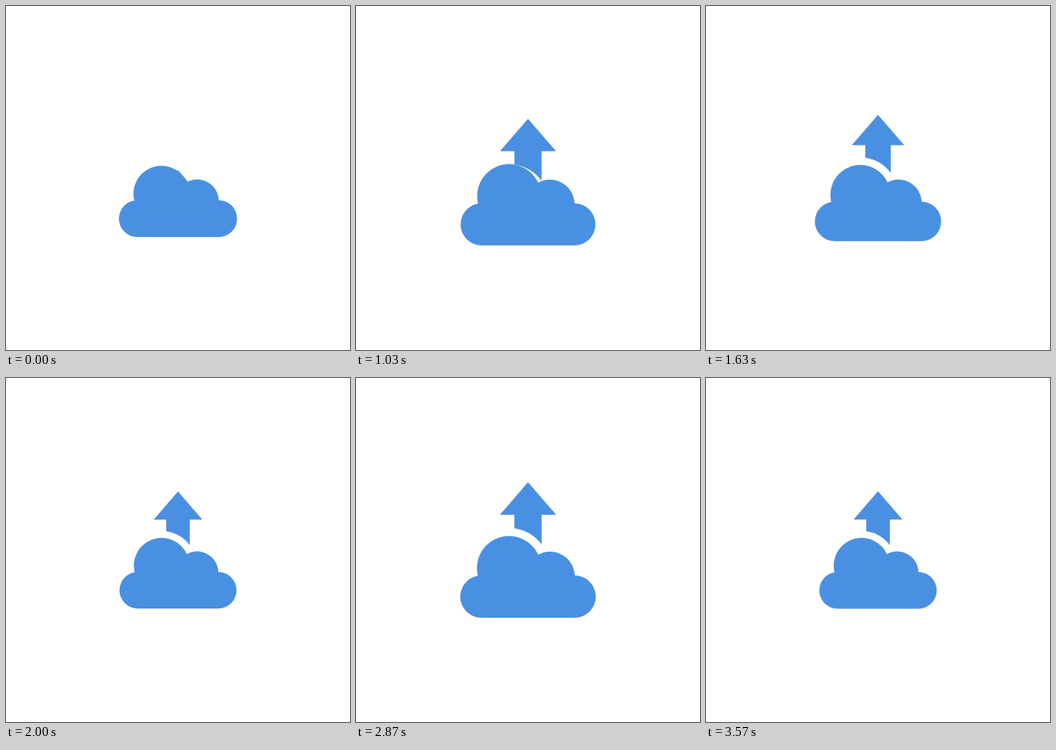
An HTML page that plays this animation: 640x640 px, repeating every 3610 ms.

```html
<!DOCTYPE html>
<html lang="en">
<head>
<meta charset="utf-8">
<title>Cloud upload</title>
<style>
  html, body { margin: 0; width: 100%; height: 100%; overflow: hidden; background: #fff; }
  svg { display: block; width: 100%; height: 100%; fill: #4a90e2; }
  #icon, #arrow { transform-box: view-box; transform-origin: 0 0; }
</style>
</head>
<body>
<svg viewBox="0 0 640 640">
  <g transform="translate(320 320)">
    <g id="icon">
      <path id="arrow" d="M0-128 53.2-66.5H25.8V-10.3A76 76 0 0 0-25.8-41.1V-66.5H-53.2Z"/>
      <circle cx="-35.9" cy="34.2" r="60.6"/>
      <circle cx="41.6" cy="49.8" r="46.7"/>
      <rect x="-128" y="48" width="80" height="80" rx="40"/>
      <rect x="48" y="48" width="80" height="80" rx="40"/>
      <rect x="-88" y="50" width="176" height="78"/>
    </g>
  </g>
</svg>
<script>
  const LOOP = 3610;

  // Each step is [time in ms, value]; values run linearly between steps.
  function play(id, steps, toTransform) {
    const frames = steps.map(([ms, v]) => ({ offset: ms / LOOP, transform: toTransform(v) }));
    const anim = document.getElementById(id).animate(frames, { duration: LOOP, iterations: Infinity });
    anim.startTime = document.timeline.currentTime;
  }

  // A slow first swell, then a steady pulse.
  play('icon',
    [[0, 0.852], [1190, 1], [1997, 0.85], [2790, 1], [3590, 0.85], [LOOP, 0.85]],
    s => `scale(${s})`);

  // The arrow rises out of the cloud and stays up.
  play('arrow',
    [[0, 116.5], [1190, 0], [LOOP, 0]],
    y => `translate(0px, ${y}px)`);
</script>
</body>
</html>
```
